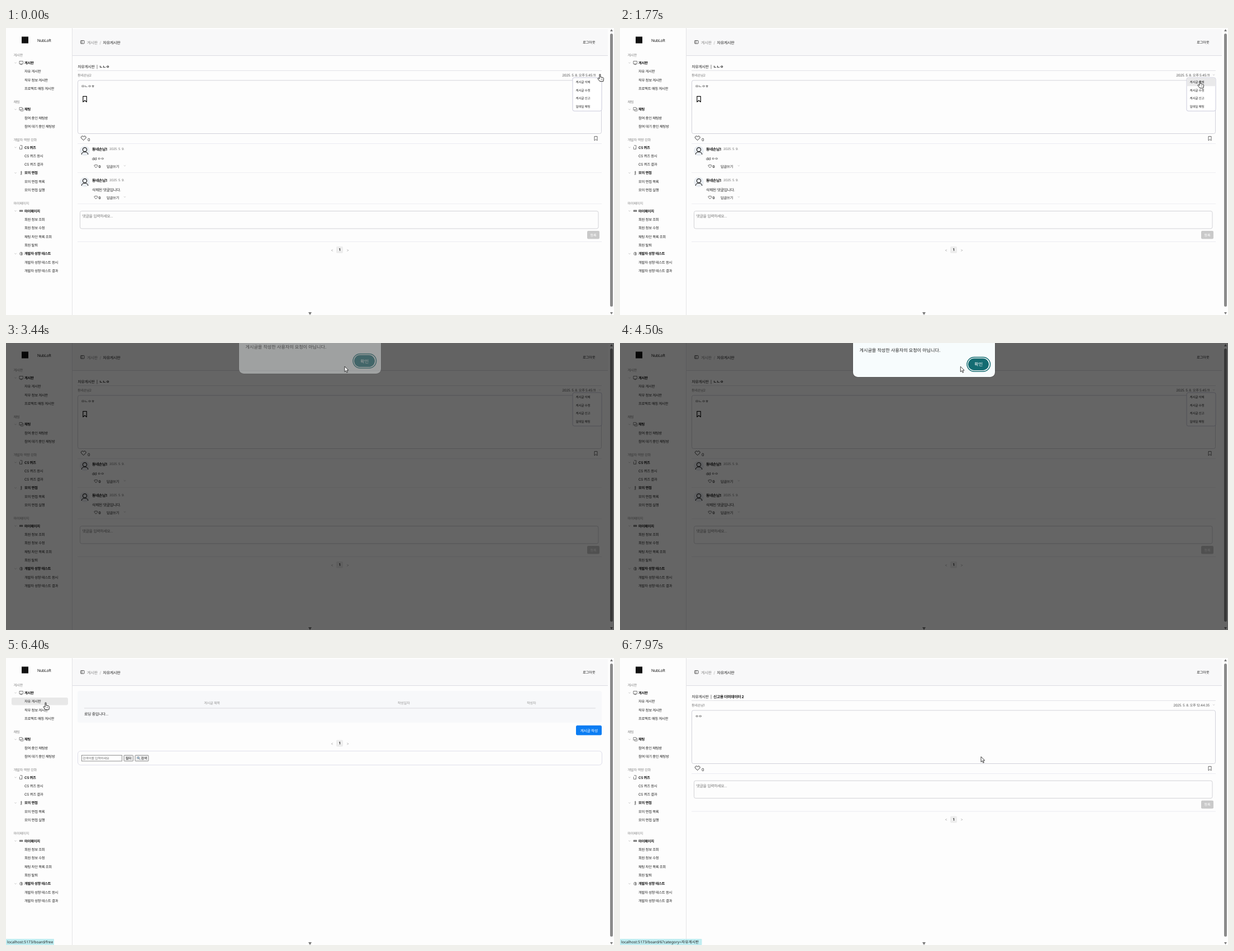
Animation, 1088 px wide and 515 px high, one loop 8000 ms. Source, as an HTML page:

```html
<!DOCTYPE html>
<html lang="ko">
<head>
<meta charset="utf-8">
<title>게시판</title>
<style>
html, body { margin: 0; width: 100%; height: 100%; overflow: hidden; background: #fdfdfd; }
svg { display: block; width: 1088px; height: 515px; }
text { font-family: Inter, "Noto Sans CJK KR", "Noto Sans CJK", sans-serif; letter-spacing: -.045em;
  text-rendering: geometricPrecision; white-space: pre; }
.sys text { font-family: "Noto Sans", "Noto Sans CJK KR", "Noto Sans CJK", sans-serif; letter-spacing: 0; }
</style>
</head>
<body>
<svg id="stage" viewBox="0 0 1088 515"></svg>
<script>
const stage = document.getElementById('stage');

// y is the visual middle of the text
const text = (x, y, s, size = 6.35, fill = '#222', weight = 400, anchor = 'start') =>
  `<text x="${x}" y="${y + size * .37}" font-size="${size}" fill="${fill}" font-weight="${weight}" text-anchor="${anchor}">${s}</text>`;
const rect = (x, y, w, h, fill, r = 0, stroke = 'none', sw = 1) =>
  `<rect x="${x}" y="${y}" width="${w}" height="${h}" rx="${r}" fill="${fill}" stroke="${stroke}" stroke-width="${sw}"/>`;
const path = (d, stroke = '#222', sw = .8, fill = 'none') =>
  `<path d="${d}" stroke="${stroke}" stroke-width="${sw}" fill="${fill}" stroke-linejoin="round"/>`;
const circle = (x, y, r, fill, stroke = 'none', sw = 1) =>
  `<circle cx="${x}" cy="${y}" r="${r}" fill="${fill}" stroke="${stroke}" stroke-width="${sw}"/>`;
const hline = (x1, x2, y, color = '#ebebf1') => path(`M${x1} ${y}H${x2}`, color, 1);
const group = (id, body) => `<g id="${id}">${body}</g>`;
const shift = (dx, dy, body) => `<g transform="translate(${dx} ${dy})">${body}</g>`;

const chevron = (x, y) => path(`M${x - 1.7} ${y - .7}l1.7 1.5l1.7 -1.5`, '#999', .5);
const heart = (x, y, s, sw) =>
  path(`M${x} ${y + s}l${-s} ${-s}a${s * .58} ${s * .58} 0 0 1 ${s} ${-s * .65}a${s * .58} ${s * .58} 0 0 1 ${s} ${s * .65}z`, '#222', sw);
const bookmark = (x, y, w, h, color, sw) =>
  path(`M${x} ${y}h${w}v${h}l${-w / 2} ${-h * .27}l${-w / 2} ${h * .27}z`, color, sw);

// Icons sit around (27, y)
const icons = {
  board: y => path(`M24 ${y - 3}h6.4v5h-6.4zM25.6 ${y + 3.2}h3.2`, '#444', .7),
  chat: y => path(`M24 ${y - 3.4}h5v4h-4l-1 1zM29.5 ${y - 1.6}h1.2v4.6h-4.4v-2`, '#555', .7),
  quiz: y => path(`M25 ${y - 3.4}h3.8v6.6h-4.4v-4.4M27 ${y + 1.6}h.8`, '#444', .7),
  talk: y => circle(27.4, y - 2.2, 1, '#555') + path(`M27.4 ${y - 1}v3.4M25.6 ${y + 2.8}h3M26 ${y}h2.8`, '#555', .8),
  card: y => rect(24, y - 1.8, 6.2, 3.4, '#666', .6) + path(`M26 ${y - 1.6}v3M28.2 ${y - 1.6}v3`, '#ddd', .5),
  test: y => circle(27.2, y, 2.8, '#ddd', '#777', .6) + path(`M27 ${y - 2.6}l1.2 2.4l-.8 .6l1 2`, '#444', 1)
};

const menu = [
  [49, '게시판', [[62.5, 'board', '게시판', ['자유 게시판', '직무 정보 게시판', '프로젝트 매칭 게시판']]]],
  [132.5, '채팅', [[146, 'chat', '채팅', ['참여 중인 채팅방', '참여 대기 중인 채팅방']]]],
  [200.5, '개발자 역량 강화', [[214.2, 'quiz', 'CS 퀴즈', ['CS 퀴즈 응시', 'CS 퀴즈 결과']],
    [260, 'talk', '모의 면접', ['모의 면접 목록', '모의 면접 실행']]]],
  [314.5, '마이페이지', [[328.2, 'card', '마이페이지', ['회원 정보 조회', '회원 정보 수정', '채팅 차단 목록 조회', '회원 탈퇴']],
    [405, 'test', '개발자 성향 테스트', ['개발자 성향 테스트 응시', '개발자 성향 테스트 결과']]]]
];

const sidebar = () =>
  group('sideHover', rect(10, 71, 101, 13.5, '#e8e8e8', 3)) +
  rect(28, 15.5, 12, 12, '#111') + text(56, 22, 'NubLoft', 7.1) +
  menu.map(([y, label, sections]) => text(13.5, y, label, 6.3, '#888') +
    sections.map(([sy, icon, title, items]) =>
      chevron(17, sy) + icons[icon](sy) + text(33, sy, title, 6.35, '#111', 600) +
      items.map((s, i) => text(33, sy + 15.4 * (i + 1), s)).join('')).join('')).join('') +
  path('M118.5 0V515', '#e4e4e6', 1);

const header = () =>
  rect(119, 2, 958, 47, '#f8f8f9') + hline(119, 1077, 49.5, '#dcdce2') +
  rect(133.5, 22.5, 6.5, 5.5, 'none', .8, '#333', .8) + path('M135.8 22.5v5.5', '#333', .8) +
  text(145, 26.5, '게시판', 7.1, '#888') + text(167.5, 26.5, '/', 7, '#aaa') +
  text(173.5, 26.5, '자유게시판', 7.05, '#222', 500) + text(1032, 26, '로그아웃', 6.35, '#222', 500);

const scrollbar = () =>
  rect(1081, 10, 5, 490, '#8b8b8b', 2.5) +
  path('M1081 6l2.5 -4l2.5 4z', 'none', 0, '#777') + path('M1081 510l2.5 4l2.5 -4z', 'none', 0, '#777') +
  rect(537, 507, 14, 8, '#fff') + path('M541 510h6l-3 5z', 'none', 0, '#777');

const pager = y => text(583.5, y, '&lt;', 7, '#aaa', 400, 'middle') + rect(591, y - 6, 12, 12, '#ededed', 2) +
  text(597, y, '1', 6.3, '#222', 700, 'middle') + text(611.5, y, '&gt;', 7, '#aaa', 400, 'middle');

const post = (title, author, date, content) =>
  text(128.5, 69.5, '자유게시판', 6.9, '#222', 500) + path('M163 66v7.5', '#555', .7) +
  text(167, 69.5, title, 6.85, '#111', 700) + hline(128, 1066, 76.5, '#e2e2e6') +
  text(128, 85, author, 6.1, '#777') + text(1055, 85, date, 6.2, '#555', 400, 'end') + chevron(1062.5, 84) +
  rect(128.5, 94, 937, 95.5, '#fdfdfd', 3, '#d2d2da') + text(134.5, 104.5, content, 6.9) +
  heart(138.7, 197.6, 4, .9) + text(146, 200, '0', 7.2) +
  bookmark(1053, 194.5, 5, 7.5, '#444', .8) + hline(128, 1066, 207.5);

const comment = (y, body) =>
  circle(141, y + 3.5, 9, '#e9edf2') + circle(141, y + 1.2, 3.6, 'none', '#222', 1.2) +
  path(`M135.2 ${y + 10}c0 -6 11.6 -6 11.6 0`, '#222', 1.2) +
  text(154, y, '동네손님1', 6.9, '#111', 700) + text(185, y, '2025. 5. 9.', 5.9, '#777') +
  text(154, y + 17, body, 6.9) + heart(161, y + 31, 2.7, .7) + text(165.5, y + 31.5, '0', 6.3, '#222', 600) +
  text(180, y + 31.5, '답글쓰기') + chevron(212.5, y + 30) + hline(128, 1066, y + 42.5, '#eeeef2');

const commentForm = () =>
  rect(132.5, 328.5, 927.5, 31.5, '#fdfdfd', 3, '#d2d2d6') + text(136.5, 337.5, '댓글을 입력하세요...', 6.9, '#777') +
  rect(1040, 364, 22, 14.5, '#c9c9c9', 2) + text(1051, 371.5, '등록', 6.2, '#fff', 400, 'middle') +
  hline(128, 1066, 383.5) + pager(398);

const popup = () =>
  rect(1014, 89, 52, 60, '#fff', 3, '#c3c3d6', .9) + group('itemHover', rect(1014.5, 0, 51, 14.8, '#e9e9ea')) +
  ['게시글 삭제', '게시글 수정', '게시글 신고', '일대일 채팅'].map((s, i) => text(1019.5, 97 + 14.7 * i, s, 5.6)).join('');

const firstPost = () =>
  post('ㄴㄴㅇ', '동네손님2', '2025. 5. 8. 오후 5:45:11', 'ㅁㄴㅇㅎ') +
  bookmark(137.8, 122.7, 6.5, 10, '#111', 1.2) +
  comment(217, 'dd ㅇㅇ') + comment(273, '삭제된 댓글입니다.') + commentForm() + popup();

const secondPost = () =>
  post('신고용 더미데이터 2', '동네손님1', '2025. 5. 8. 오후 12:44:35', 'ㅇㅇ') + shift(0, -108.3, commentForm());

const list = () =>
  rect(128, 59, 938, 57, '#f7f8fa', 4) +
  [[368.5, '게시글 제목'], [711.5, '작성일자'], [940, '작성자']].map(([x, s]) => text(x, 80.5, s, 6.2, '#999', 400, 'middle')).join('') +
  hline(140, 1055, 90, '#d9d9dd') + text(140, 100, '로딩 중입니다...', 6.9) +
  rect(1020, 121, 46, 17.5, '#0b7df3', 2.5) + text(1043.3, 130, '게시글 작성', 6.8, '#fff', 500, 'middle') +
  pager(153) + rect(128.5, 167, 938, 25, '#fdfdfd', 5, '#dedeea') +
  rect(135.5, 174.5, 72, 10.5, '#fff', 0, '#777', .8) + text(137, 180, '검색어를 입력하세요', 5.9, '#777') +
  rect(211, 174.5, 16.5, 10.5, '#efefef', 1, '#777', .8) + text(219.2, 180, '필터', 5.9, '#111', 400, 'middle') +
  rect(231, 174.5, 24, 10.5, '#efefef', 1, '#777', .8) + text(241.5, 180, '검색', 5.9, '#111') +
  circle(236.6, 179, 1.7, '#bfe0f5', '#456', .7) + path('M238 180.4l2 2', '#456', 1);

const teal = '#146c72';
const ring = x => rect(x - 2, 25.5, 41.5, 25.5, '#fff', 12.7, teal, 1.5);
const pill = (x, s, fill, color) => rect(x, 27.5, 37, 21.5, fill, 10.7) + text(x + 18.7, 38.5, s, 8.1, color, 400, 'middle');
const dialog = (id, message, buttons) => `<g id="${id}" class="sys">` +
  rect(416, -40, 256, 102, '#0002', 9.5) + rect(417, -40, 254, 101, '#f7fcfd', 8.5) +
  text(428.5, 13, message, 8.1, '#222') + buttons + '</g>';

const status = (id, w, s) => `<g id="${id}" class="sys">` + rect(0, 504, w, 11, '#c0edf1', 1) + text(2, 510, s, 6.75) + '</g>';

const cursor = group('arrow', path('M0 0v9.6l2.2 -2.1l1.6 3.6l1.6 -.7l-1.6 -3.5h3z', '#111', .8, '#fff')) +
  group('hand', path('M-1 .8c0 -1.3 1.9 -1.3 1.9 0v4.2l4.2 1c1.4 .4 1.6 1.2 1.4 2.4l-.7 4.4h-6l-3.6 -4.4c-.7 -1.3 .7 -2 1.6 -1.2l1.2 1z', '#111', .9, '#fff') +
    path('M2.2 7.6v2.4M4 7.8v2.2', '#111', .5));

stage.innerHTML = rect(0, 0, 1088, 515, '#fdfdfd') + sidebar() + header() +
  group('first', firstPost()) + group('list', list()) + group('second', secondPost()) + scrollbar() +
  status('freeUrl', 86, 'localhost:5173/board/free') + status('postUrl', 146.5, 'localhost:5173/board/6?category=자유게시판') +
  group('dim', rect(0, 0, 1088, 515, '#0009')) +
  dialog('confirm', '정말 게시글을 삭제하시겠습니까?', ring(582) + pill(582, '확인', teal, '#fff') + pill(623, '취소', '#a3f5fd', '#123')) +
  dialog('alert', '게시글을 작성한 사용자의 요청이 아닙니다.', group('alertRing', ring(623)) + pill(623, '확인', teal, '#fff')) +
  group('cursor', cursor);

const $ = id => document.getElementById(id);
const show = (id, on) => $(id).style.display = on ? '' : 'none';
const clamp = v => Math.max(0, Math.min(1, v));
const within = (t, a, b) => t >= a && t < b;

// time, x, y of the pointer tip
const track = [[0, 1063, 83], [300, 1063, 83], [750, 1050, 126], [1250, 1050, 126], [1700, 1038, 95], [2250, 1038, 95],
  [2850, 606, 36], [3230, 606, 36], [3400, 606, 42], [4400, 606, 42], [4800, 627, 43], [5420, 627, 43],
  [6150, 71, 80], [6650, 71, 80], [7250, 646, 177], [8000, 646, 177]];

function pointer(t) {
  const i = track.findIndex(k => k[0] > t);
  const [a, b] = [track[i - 1], track[i]];
  const p = (t - a[0]) / (b[0] - a[0]), e = p * p * (3 - 2 * p);
  return [a[1] + (b[1] - a[1]) * e, a[2] + (b[2] - a[2]) * e];
}

function poseDialog(id, t, open, close) {
  const shown = clamp((t - open) / 175), left = 1 - clamp((t - close) / 200);
  const g = $(id);
  show(id, shown * left > 0);
  g.setAttribute('opacity', shown * Math.min(1, left * 1.4));
  g.setAttribute('transform', `translate(0 ${-10 * (1 - shown * left)})`);
}

function draw(t) {
  const [x, y] = pointer(t);
  show('first', t < 6330);
  show('list', within(t, 6330, 7700));
  show('second', t >= 7700);
  show('dim', within(t, 2160, 3200) || within(t, 3320, 5240));
  poseDialog('confirm', t, 2180, 3200);
  poseDialog('alert', t, 3370, 5240);
  show('alertRing', t < 4700);

  const item = t < 2160 ? Math.floor((y - 89) / 14.8) : t < 3200 ? 0 : -1;
  show('itemHover', item >= 0);
  $('itemHover').setAttribute('transform', `translate(0 ${89.5 + 14.75 * item})`);

  const onSide = within(t, 6130, 6700), onRow = within(t, 7200, 7700);
  show('sideHover', onSide);
  show('freeUrl', onSide);
  show('postUrl', t >= 7200);
  const hand = t < 2160 || onSide || onRow;
  show('hand', hand);
  show('arrow', !hand);
  $('cursor').setAttribute('transform', `translate(${x} ${y})`);
}

const start = performance.now();
function tick() {
  draw((performance.now() - start) % 8000);
  requestAnimationFrame(tick);
}
tick();
</script>
</body>
</html>
```
